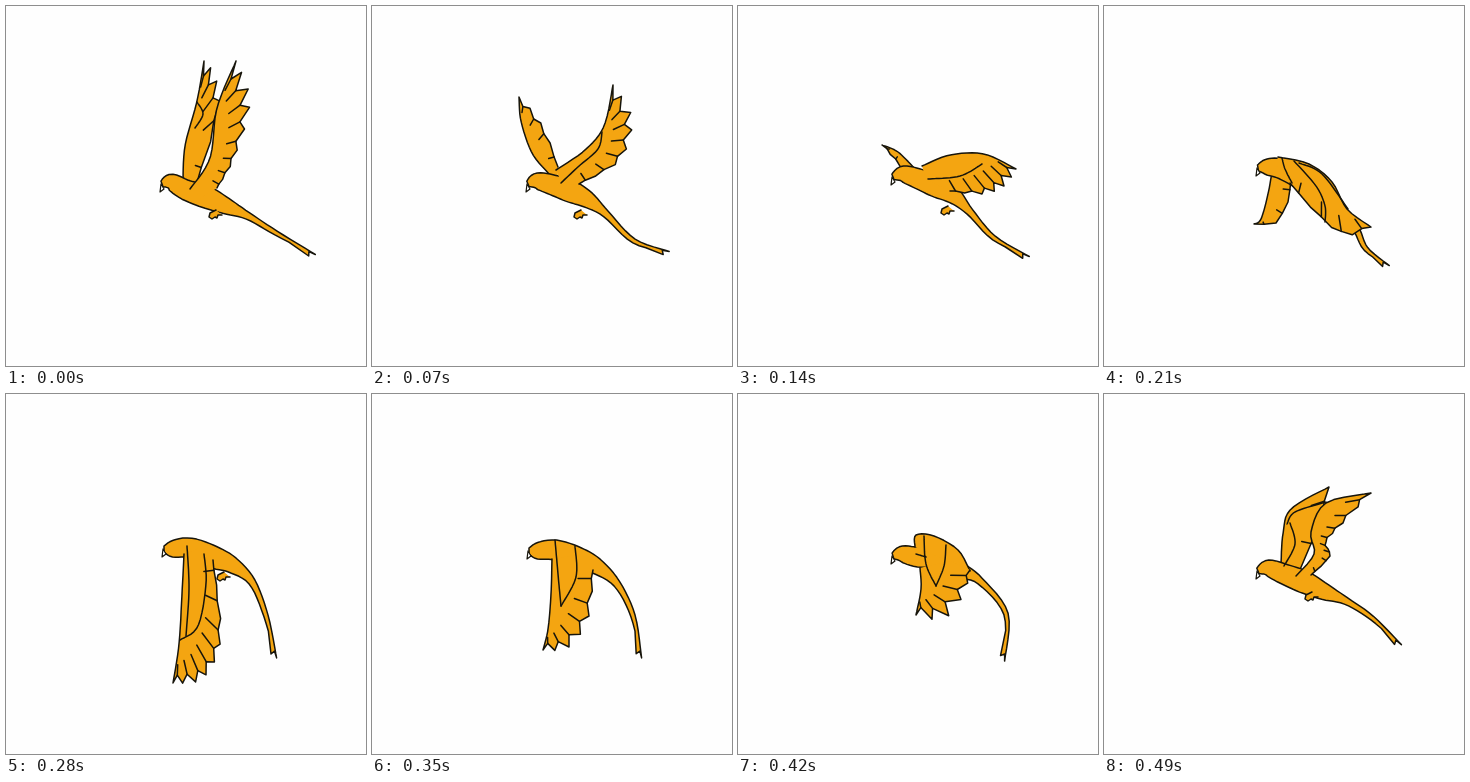
An HTML page for the animation above (0.56 s loop, 360 by 360 pixels).

```html
<!DOCTYPE html>
<html lang="en">
<head>
<meta charset="utf-8">
<title>Flying bird</title>
<style>
html, body { margin: 0; width: 100%; height: 100%; overflow: hidden; background: #fefefe; }
svg { display: block; width: 100%; height: 100%; }
path { fill: #f4a511; stroke: #17150c; stroke-width: 1.5; stroke-linejoin: round; stroke-linecap: round; }
.line { fill: none; }
.fill { stroke: none; }
.beak { fill: #fff; stroke-width: 1.2; }
</style>
</head>
<body>
<svg id="stage" viewBox="0 0 360 360"></svg>
<script>
const STEP = 70;
const GIRTH = [3, 8, 10, 11, 8, 3.5, 2.2, 0.6];

const pairs = xy => xy.flatMap((x, i) => i % 2 ? [] : [[x, xy[i + 1]]]);
const mix = (a, b, t) => a.map((v, i) => v + (b[i] - v) * t);
const path = (pts, cls = '') =>
  `<path class="${cls}" d="M${pts.map(p => p.slice(0, 2).map(v => v.toFixed(1))).join('L')}"/>`;

// Point on a Catmull-Rom spline, t from 0 to 1
function at(pts, t) {
  const last = pts.length - 1;
  const i = Math.min(Math.floor(t * last), last - 1);
  const f = t * last - i;
  const a = pts[Math.max(i - 1, 0)], b = pts[i], c = pts[i + 1], d = pts[Math.min(i + 2, last)];
  return b.map((v, k) => v + f / 2 * (c[k] - a[k] +
    f * (2 * a[k] - 5 * v + 4 * c[k] - d[k] + f * (3 * (v - c[k]) + d[k] - a[k]))));
}

const sample = (pts, n = 20) => Array.from({ length: n + 1 }, (_, i) => at(pts, i / n));
const line = (...xy) => path(sample(pairs(xy)), 'line');
const shape = (...xy) => path(sample(pairs(xy)));

// Spine from face to tail tip, thickened by GIRTH
function body(...xy) {
  const spine = sample(pairs(xy).map((p, i) => [...p, GIRTH[i]]), 42);
  const top = [], belly = [];
  let ux, uy;
  spine.forEach(([x, y, w], i) => {
    const a = spine[Math.max(i - 1, 0)], b = spine[Math.min(i + 1, 42)];
    const len = Math.hypot(b[0] - a[0], b[1] - a[1]);
    ux = (b[0] - a[0]) / len;
    uy = (b[1] - a[1]) / len;
    top.push([x + uy * w, y - ux * w]);
    belly.unshift([x - uy * w, y + ux * w]);
  });
  const [ex, ey] = spine[42];
  const fork = [[ex - 7 * ux, ey - 7 * uy], [ex - 5 * ux - 4 * uy, ey - 5 * uy + 4 * ux]];
  const outline = [...top, ...fork, ...belly.slice(4)];
  const [fx, fy] = spine[0];
  const beak = [[fx - 1, fy], [fx - 2, fy + 8], [fx + 2, fy + 5]];
  return path([...outline, outline[0]]) + path([...beak, beak[0]], 'beak');
}

// Leading edge from root to tip, then n feathers along the trailing edge
function wing(front, back, n, depth) {
  const lead = pairs(front), trail = pairs(back);
  const edge = sample(lead);
  let slits = '';
  for (let k = 1; k <= n; k++) {
    const u = (k - 0.5) / n;
    const base = at(lead, 0.75 - 0.6 * u);
    const rim = at(trail, u);
    const cut = depth * (1 - u);
    const notch = mix(rim, base, cut);
    slits += path([notch, mix(rim, base, cut + 0.32)], 'line');
    edge.push(notch, at(trail, k / n));
  }
  const mid = mix(lead[0], trail[trail.length - 1], 0.5);
  const tip = trail[0];
  const inner = mix(mid, tip, -10 / Math.hypot(tip[0] - mid[0], tip[1] - mid[1]));
  return path([...edge, inner], 'fill') + path(edge, 'line') + slits;
}

function foot(x, y) {
  return `<path d="M${x + 6} ${y - 2}l-6 3-1 4 3 2 3-2 2 1 1-3 4 0"/>`;
}

const raised = () =>
  wing([177, 176, 179, 140, 191, 95, 198, 55], [198, 55, 209, 70, 213, 105, 190, 180], 5, 0.4) +
  body(156, 178, 165, 176, 180, 184, 200, 191, 220, 200, 242, 210, 270, 227, 309, 249) +
  foot(204, 206) +
  wing([184, 183, 204, 152, 211, 102, 230, 55], [230, 55, 244, 95, 229, 150, 211, 182], 8, 0.4) +
  line(191, 96, 197, 108, 189, 122);

const open = () =>
  wing([177, 168, 160, 147, 149, 115, 147, 91], [147, 91, 162, 107, 175, 129, 186, 161], 4, 0.3) +
  body(156, 178, 165, 175, 181, 179, 198, 185, 216, 194, 234, 208, 262, 235, 297, 246) +
  foot(203, 206) +
  wing([184, 164, 213, 144, 232, 120, 241, 79], [241, 79, 260, 112, 248, 154, 207, 178], 7, 0.35) +
  line(230, 126, 226, 143, 207, 160, 189, 177);

const level = () =>
  wing([178, 164, 160, 146, 144, 139], [144, 139, 157, 154, 170, 170], 3, 0.3) +
  body(155, 171, 165, 168, 181, 173, 198, 180, 216, 190, 232, 206, 256, 232, 291, 251) +
  foot(204, 202) +
  wing([184, 160, 212, 149, 246, 148, 278, 163], [278, 163, 266, 180, 244, 188, 212, 185], 6, 0.3) +
  line(244, 158, 222, 170, 190, 173);

const sinking = () =>
  wing([168, 166, 164, 188, 157, 213, 150, 218], [150, 218, 172, 217, 184, 196, 187, 174], 3, 0.1) +
  body(154, 162, 163, 161, 178, 163, 200, 174, 222, 192, 250, 220, 262, 243, 285, 260) +
  wing([174, 151, 205, 158, 228, 176, 243, 203, 267, 221], [267, 221, 241, 229, 214, 209, 186, 177], 4, 0.08) +
  line(178, 152, 181, 163, 188, 177) +
  line(190, 155, 212, 180, 221, 200, 221, 216) +
  line(195, 157, 218, 168, 244, 203);

const lowered = () =>
  body(158, 155, 166, 155, 184, 154, 207, 163, 226, 171, 246, 188, 260, 222, 270, 264) +
  foot(212, 180) +
  wing([178, 160, 176, 200, 173, 250, 167, 289], [167, 289, 197, 284, 215, 243, 207, 166], 8, 0.25) +
  line(181, 152, 183, 195, 180, 242) +
  line(198, 160, 200, 190, 192, 232, 174, 246);

const folding = () =>
  body(157, 157, 165, 157, 183, 156, 205, 164, 224, 172, 245, 190, 261, 222, 269, 264) +
  wing([180, 165, 179, 200, 176, 235, 171, 256], [171, 256, 197, 253, 217, 222, 221, 176], 6, 0.4) +
  line(183, 146, 186, 180, 189, 212) +
  line(203, 152, 204, 183, 189, 212);

const folded = () =>
  body(155, 162, 164, 160, 180, 163, 202, 163, 222, 176, 242, 187, 268, 220, 266, 267) +
  shape(177, 153, 178, 141, 196, 142, 220, 156, 232, 177) +
  wing([182, 174, 183, 195, 178, 221], [178, 221, 206, 225, 226, 200, 232, 176], 5, 0.6) +
  line(186, 142, 188, 170, 198, 192) +
  line(208, 151, 206, 172, 198, 192) +
  line(178, 160, 188, 163);

const lifting = () =>
  wing([177, 170, 179, 140, 187, 115, 225, 93], [225, 93, 222, 112, 212, 140, 195, 178], 2, 0.1) +
  body(154, 177, 164, 174, 180, 180, 200, 188, 221, 198, 242, 207, 268, 224, 297, 251) +
  foot(202, 200) +
  wing([192, 182, 210, 160, 207, 138, 222, 109, 267, 99], [267, 99, 239, 129, 222, 148, 226, 162, 207, 181], 8, 0.15) +
  line(183, 130, 191, 118, 222, 108) +
  line(186, 129, 191, 150, 180, 172);

const poses = [raised, open, level, sinking, lowered, folding, folded, lifting].map(pose => pose());
const stage = document.getElementById('stage');
let shown = -1;

function draw(time) {
  const i = Math.floor(time / STEP) % poses.length;
  if (i !== shown) stage.innerHTML = poses[shown = i];
}

const start = performance.now();
function tick() {
  draw(performance.now() - start);
  requestAnimationFrame(tick);
}
draw(0);
requestAnimationFrame(tick);
</script>
</body>
</html>
```
